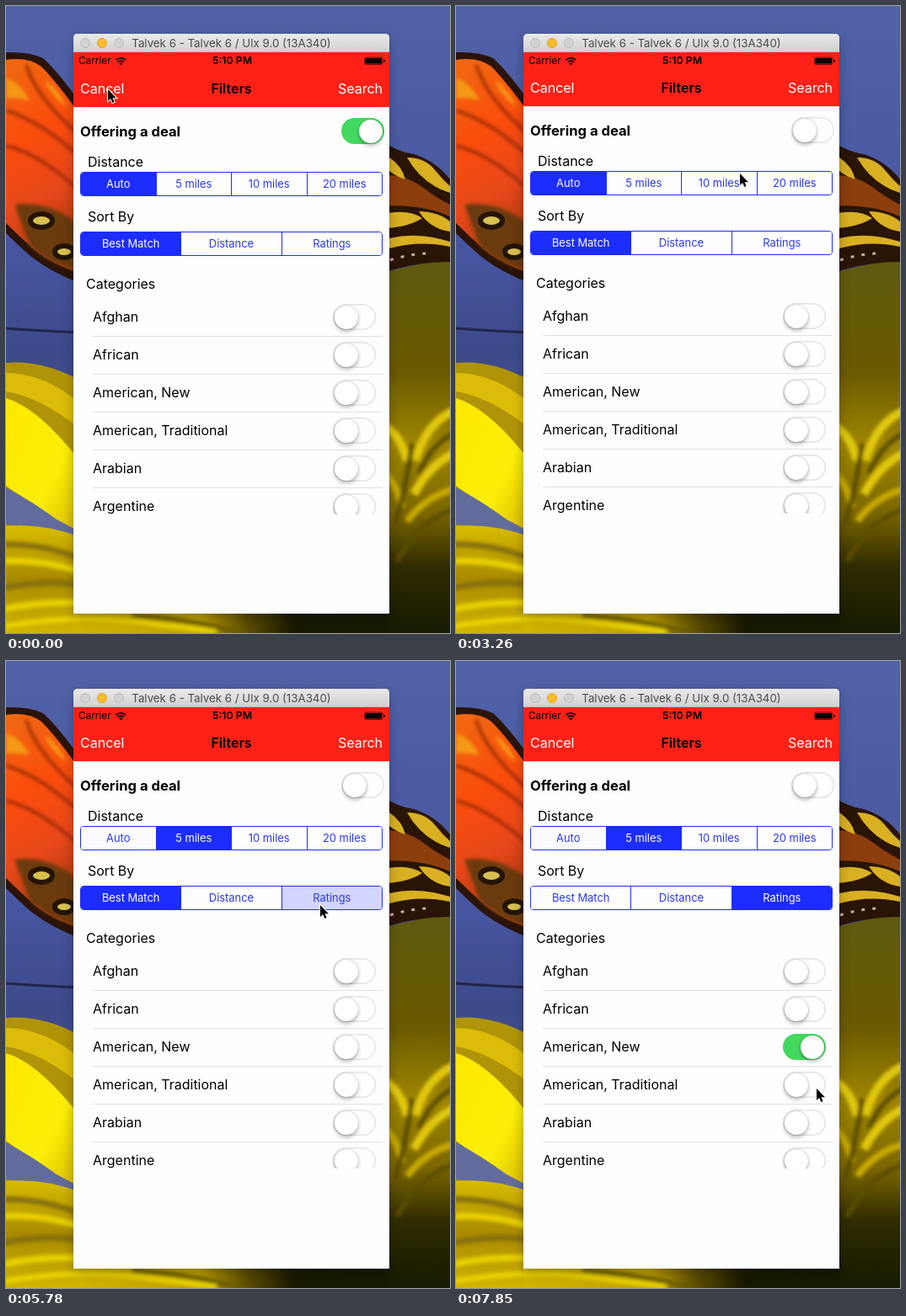
Recreate the animation shown at these times as an HTML page. Size 527x745 px, loop 8000 ms.

```html
<!DOCTYPE html>
<html lang="en">
<head>
<meta charset="utf-8">
<title>Filters</title>
<style>
html, body { margin: 0; width: 100%; height: 100%; overflow: hidden; }
body { position: relative; background: #4b5aa2; font: 16px/20px Inter, Roboto, sans-serif; color: #000; }
.wall, .phone, .bar, .t, .seg, .sw, .sw b, .list, .status, #app, .cursor, .lamp { position: absolute; }
.wall { left: 0; top: 0; }
.t { white-space: nowrap; }
.mid { left: 80px; width: 375px; text-align: center; }

.phone { left: 80px; top: 33px; width: 375px; height: 689px; background: #fefefe; border-radius: 5px 5px 0 0; box-shadow: 0 0 1px #0006, 0 5px 14px #0004; }
.bar { left: 80px; top: 33px; width: 375px; height: 22px; border-radius: 5px 5px 0 0; background: linear-gradient(#eaeaea, #d0d0d0); box-shadow: inset 0 -1px #b8b8b8; }
.lamp { top: 5px; width: 10px; height: 10px; border: 1px solid #bcbcbc; border-radius: 50%; background: #d2d2d2; }
.status { left: 80px; top: 55px; width: 375px; height: 30px; background: #ff2117; }

#app { left: 0; top: 0; width: 527px; height: 745px; animation: nudge 8s step-end infinite; }
.nav { position: absolute; left: 80px; top: 75px; width: 375px; height: 44px; background: #ff2117; box-shadow: 0 1px #0002; }
.seg { left: 88px; width: 357px; height: 27px; display: flex; border: 1px solid #1d2cff; border-radius: 4px; overflow: hidden; }
.seg span { flex: 1; font-size: 12.9px; line-height: 27px; text-align: center; color: #2a38ee; background: #fefefe; }
.seg span + span { border-left: 1px solid #1d2cff; }

.list { left: 103px; top: 347px; width: 344px; height: 256px; overflow: hidden; }
.row { position: relative; height: 45px; line-height: 43px; box-sizing: border-box; border-bottom: 1px solid #e0e0e2; }
.row .sw { left: 285px; top: 6px; }
.sw { width: 51px; height: 31px; border-radius: 16px; background: #fefefe; box-shadow: inset 0 0 0 1.5px #e3e3e3; }
.sw b { left: 1.5px; top: 1.5px; width: 28px; height: 28px; border-radius: 14px; background: #fff; box-shadow: 0 0 1.5px #0005, 0 3px 5px #0004; }

.cursor { left: 0; top: 0; overflow: visible; animation: move 8s step-end infinite; }
.deal { animation: deal 8s step-end infinite; }
.deal b { animation: deal-knob 8s step-end infinite; }
.pick { animation: pick 8s step-end infinite; }
.pick b { animation: pick-knob 8s step-end infinite; }
.seg .auto { animation: auto-off 8s step-end infinite; }
.seg .near { animation: near-on 8s step-end infinite; }
.seg .best { animation: best-off 8s step-end infinite; }
.seg .rate { animation: rate-on 8s step-end infinite; }

@keyframes nudge { 0% { transform: translateY(1px); } 1.75%, to { transform: none; } }
@keyframes deal {
  0% { box-shadow: inset 0 0 0 16px #43d95f; }
  29.5% { box-shadow: inset 0 0 0 9px #a5e8b2; }
  31.37% { box-shadow: inset 0 0 0 3px #e0e6e1; }
  33.25%, to { box-shadow: inset 0 0 0 1.5px #e3e3e3; }
}
@keyframes deal-knob {
  0% { left: 21px; width: 28px; }
  27.75% { left: 14px; width: 35px; }
  29.5% { left: 6px; width: 33px; }
  31.37% { left: 1.5px; width: 30px; }
  33.25%, to { left: 1.5px; width: 28px; }
}
@keyframes pick {
  0% { box-shadow: inset 0 0 0 1.5px #e3e3e3; }
  90.75% { box-shadow: inset 0 0 0 12px #e3e3e3; }
  92.62% { box-shadow: inset 0 0 0 16px #83e195; }
  94.5%, to { box-shadow: inset 0 0 0 16px #43d95f; }
}
@keyframes pick-knob {
  0% { left: 1.5px; width: 28px; }
  90.75% { left: 1.5px; width: 35px; }
  92.62% { left: 15px; width: 32px; }
  94.5%, to { left: 21px; width: 28px; }
}
@keyframes auto-off {
  0% { color: #fff; background: #1d2cff; }
  57.37%, to { color: #2a38ee; background: #fafaff; }
}
@keyframes near-on {
  0% { color: #2a38ee; background: #fefefe; }
  55.5% { color: #2a38ee; background: #d2d5ff; }
  57.37%, to { color: #fff; background: #1d2cff; }
}
@keyframes best-off {
  0% { color: #fff; background: #1d2cff; }
  74.12%, to { color: #2a38ee; background: #fefefe; }
}
@keyframes rate-on {
  0% { color: #2a38ee; background: #fefefe; }
  72.25% { color: #2a38ee; background: #d2d5ff; }
  74.12%, to { color: #fff; background: #1d2cff; }
}
@keyframes move {
  0% { transform: translate(121px, 99px); }
  5.5% { transform: translate(140px, 138px); }
  7.37% { transform: translate(170px, 180px); }
  9.25% { transform: translate(212px, 197px); }
  11% { transform: translate(262px, 198px); }
  12.87% { transform: translate(310px, 193px); }
  14.75% { transform: translate(352px, 187px); }
  16.62% { transform: translate(385px, 181px); }
  18.37% { transform: translate(401px, 177px); }
  20.25% { transform: translate(407px, 166px); }
  22.12% { transform: translate(413px, 156px); }
  24% { transform: translate(416px, 152px); }
  37% { transform: translate(398px, 167px); }
  38.87% { transform: translate(368px, 187px); }
  40.75% { transform: translate(337px, 199px); }
  42.5% { transform: translate(305px, 206px); }
  44.37% { transform: translate(280px, 207px); }
  46.25% { transform: translate(264px, 207px); }
  50% { transform: translate(245px, 212px); }
  51.87% { transform: translate(231px, 214px); }
  61.12% { transform: translate(260px, 242px); }
  63% { transform: translate(318px, 288px); }
  64.75% { transform: translate(360px, 305px); }
  66.62% { transform: translate(373px, 290px); }
  76% { transform: translate(377px, 306px); }
  77.75% { transform: translate(392px, 345px); }
  79.62% { transform: translate(408px, 388px); }
  81.5% { transform: translate(420px, 423px); }
  83.37% { transform: translate(420px, 441px); }
  85.12% { transform: translate(418px, 450px); }
  87% { transform: translate(417px, 450px); }
  96.25% { transform: translate(424px, 482px); }
  98.12%, to { transform: translate(428px, 508px); }
}
</style>
</head>
<body>
<svg class="wall" width="527" height="745" viewBox="0 0 527 745">
  <defs>
    <linearGradient id="sky" x2="0" y2="1">
      <stop offset="0" stop-color="#5262a8"/><stop offset=".4" stop-color="#4655a0"/>
      <stop offset=".55" stop-color="#3d4a8a"/><stop offset="1" stop-color="#5a659c"/>
    </linearGradient>
    <linearGradient id="wing" x2=".2" y2="1">
      <stop offset="0" stop-color="#f06a12"/><stop offset=".4" stop-color="#fa4d0c"/>
      <stop offset=".7" stop-color="#e8481a"/><stop offset="1" stop-color="#a83a10"/>
    </linearGradient>
    <linearGradient id="petal" x2="1" y2="1">
      <stop offset="0" stop-color="#ffe800"/><stop offset=".6" stop-color="#fbee08"/><stop offset="1" stop-color="#d0b000"/>
    </linearGradient>
    <linearGradient id="gold" x2="0" y2="1">
      <stop offset="0" stop-color="#d8bc00"/><stop offset=".5" stop-color="#a88a00"/><stop offset="1" stop-color="#d2b400"/>
    </linearGradient>
    <linearGradient id="olive" x2="0" y2="1">
      <stop offset="0" stop-color="#5f5a10"/><stop offset=".3" stop-color="#6a5a00"/>
      <stop offset=".5" stop-color="#a08600"/><stop offset=".68" stop-color="#7a6600"/>
      <stop offset=".82" stop-color="#302c00"/><stop offset="1" stop-color="#161a00"/>
    </linearGradient>
    <linearGradient id="floor">
      <stop offset="0" stop-color="#d2b400"/><stop offset=".4" stop-color="#c0a000"/><stop offset=".55" stop-color="#5a4c00"/>
      <stop offset=".7" stop-color="#181800"/><stop offset="1" stop-color="#161a00"/>
    </linearGradient>
    <filter id="soft" x="-20%" y="-20%" width="140%" height="140%"><feGaussianBlur stdDeviation="2"/></filter>
  </defs>
  <rect width="527" height="745" fill="url(#sky)"/>

  <!-- left wing -->
  <path fill="#2a140a" d="M0 55Q28 54 44 62 62 78 90 118V330Q56 318 30 298 14 284 0 270Z"/>
  <path fill="url(#wing)" d="M0 64Q26 60 42 72 60 90 90 132V318Q56 308 34 290 16 274 0 258Z"/>
  <g filter="url(#soft)">
    <path fill="#f59a18" d="M0 86Q16 90 28 112 12 108 0 110ZM46 88Q62 98 72 120 54 108 46 88Z"/>
    <path fill="none" stroke="#8c260a" stroke-width="3" d="M0 124Q44 138 90 182M0 166Q42 176 90 222M24 70Q36 110 90 156"/>
    <path fill="#6a3a10" d="M10 236Q50 230 90 262V316Q50 306 28 284Z"/>
  </g>
  <g fill="#d8c050" stroke="#241408" stroke-width="6">
    <ellipse cx="42" cy="255" rx="13" ry="8"/><ellipse cx="69" cy="292" rx="11" ry="7"/>
  </g>
  <path fill="none" stroke="#20264a" stroke-width="3" d="M0 383Q40 386 90 388"/>

  <!-- left petals -->
  <path fill="#b09408" d="M0 424Q44 420 90 446V745H0Z"/>
  <path fill="#dcbc08" d="M0 436Q46 436 90 474V504Q40 464 0 458Z"/>
  <path fill="url(#petal)" d="M0 466Q40 478 90 544V630Q54 612 34 596 14 580 0 570Z"/>
  <path fill="#626c9c" d="M0 572Q30 588 60 610L90 626V634Q40 620 0 616Z"/>
  <path fill="url(#gold)" d="M0 618Q46 614 90 632V745H0Z"/>
  <g fill="none" filter="url(#soft)">
    <path stroke="#86700a" stroke-width="7" d="M-9 640Q50 638 99 662M-9 692Q50 680 99 690"/>
    <path stroke="#e8d000" stroke-width="8" d="M-9 660Q46 656 99 676M-9 718Q44 706 99 710"/>
  </g>

  <!-- right wing and petals -->
  <path fill="url(#olive)" d="M445 318Q480 308 527 300V745H445Z"/>
  <path fill="#2a1406" d="M445 160Q466 174 484 176 510 184 527 206V304Q486 304 445 318Z"/>
  <path fill="#8c3e0c" d="M445 202Q472 198 498 218 514 230 527 236V250Q490 234 445 238Z"/>
  <g fill="#d8b022">
    <path d="M476 180Q498 180 510 196 518 206 527 214V222Q494 212 476 180ZM455 180Q470 190 474 206 462 202 455 196Z"/>
    <path d="M445 248Q476 240 494 252 476 264 445 264ZM490 244Q512 244 527 256V268Q502 264 490 244ZM455 276Q490 268 527 280V286Q490 278 455 288Z"/>
  </g>
  <path fill="none" stroke="#c8a8a0" stroke-width="3" stroke-dasharray="4 9" d="M456 302Q480 294 504 294"/>
  <g fill="none" filter="url(#soft)">
    <path stroke="#e0c810" stroke-width="10" d="M440 496Q466 502 476 540M540 478Q500 490 486 540M540 528Q506 540 484 580"/>
    <path stroke="#c8aa00" stroke-width="8" d="M440 548Q462 560 470 596M540 572Q500 580 476 612"/>
    <path stroke="#5c4e00" stroke-width="6" d="M482 520Q476 566 462 616M540 504Q506 516 490 556M540 596Q490 608 464 660"/>
  </g>

  <rect x="80" y="716" width="375" height="29" fill="url(#floor)"/>
  <g fill="none" filter="url(#soft)">
    <path stroke="#ecd600" stroke-width="6" d="M-9 738Q80 722 160 732T250 744"/>
    <path stroke="#6a5a00" stroke-width="5" d="M150 724Q220 728 290 748"/>
  </g>
</svg>

<div class="phone"></div>
<div class="bar">
  <i class="lamp" style="left:8px"></i>
  <i class="lamp" style="left:28px;background:#fdbc2e;border-color:#dfa023"></i>
  <i class="lamp" style="left:48px"></i>
</div>
<div class="t mid" style="top:34px;font-size:13.3px;color:#4c4c4c">Talvek 6 - Talvek 6 / Ulx 9.0 (13A340)</div>
<div class="status"></div>

<div id="app">
  <div class="nav"></div>
  <div class="t" style="left:88px;top:87px;color:#fff">Cancel</div>
  <div class="t mid" style="top:87px;font-weight:600">Filters</div>
  <div class="t" style="right:80px;top:87px;color:#fff">Search</div>

  <div class="t" style="left:88px;top:138px;font-size:16.6px;font-weight:700">Offering a deal</div>
  <i class="sw deal" style="left:398px;top:132px"><b></b></i>

  <div class="t" style="left:97px;top:174px">Distance</div>
  <div class="seg" style="top:196px"><span class="auto">Auto</span><span class="near">5 miles</span><span>10 miles</span><span>20 miles</span></div>
  <div class="t" style="left:97px;top:239px">Sort By</div>
  <div class="seg" style="top:267px"><span class="best">Best Match</span><span>Distance</span><span class="rate">Ratings</span></div>

  <div class="t" style="left:95px;top:319px">Categories</div>
  <div class="list">
    <div class="row">Afghan<i class="sw"><b></b></i></div>
    <div class="row">African<i class="sw"><b></b></i></div>
    <div class="row">American, New<i class="sw pick"><b></b></i></div>
    <div class="row">American, Traditional<i class="sw"><b></b></i></div>
    <div class="row">Arabian<i class="sw"><b></b></i></div>
    <div class="row">Argentine<i class="sw"><b></b></i></div>
  </div>
</div>

<div class="t" style="left:86px;top:55px;font-size:11.8px">Carrier</div>
<div class="t mid" style="top:55px;left:81px;font-size:12.3px;font-weight:600">5:10 PM</div>
<svg class="wall" width="527" height="80">
  <path fill="none" stroke="#000" stroke-width="1.7" d="M130.6 64.2a8 8 0 0 1 11.4 0M132.7 66.6a5 5 0 0 1 7.2 0"/>
  <path d="M134.2 68.2a3 3 0 0 1 4.2 0L136.3 70.6Z"/>
  <rect x="425.5" y="61" width="21.5" height="8.5" rx="2" fill="none" stroke="#000" stroke-opacity=".6"/>
  <rect x="426.5" y="62" width="19.5" height="6.5" rx="1"/>
  <path d="M448.3 63.6q1.6 0 1.6 1.7t-1.6 1.7Z"/>
</svg>

<svg class="cursor" width="12" height="18">
  <path d="M0 0V14L3.2 11.1 5.3 16 7.5 15 5.5 10.2H9.9Z" stroke="#fff" stroke-width="2" paint-order="stroke"/>
</svg>
</body>
</html>
```
